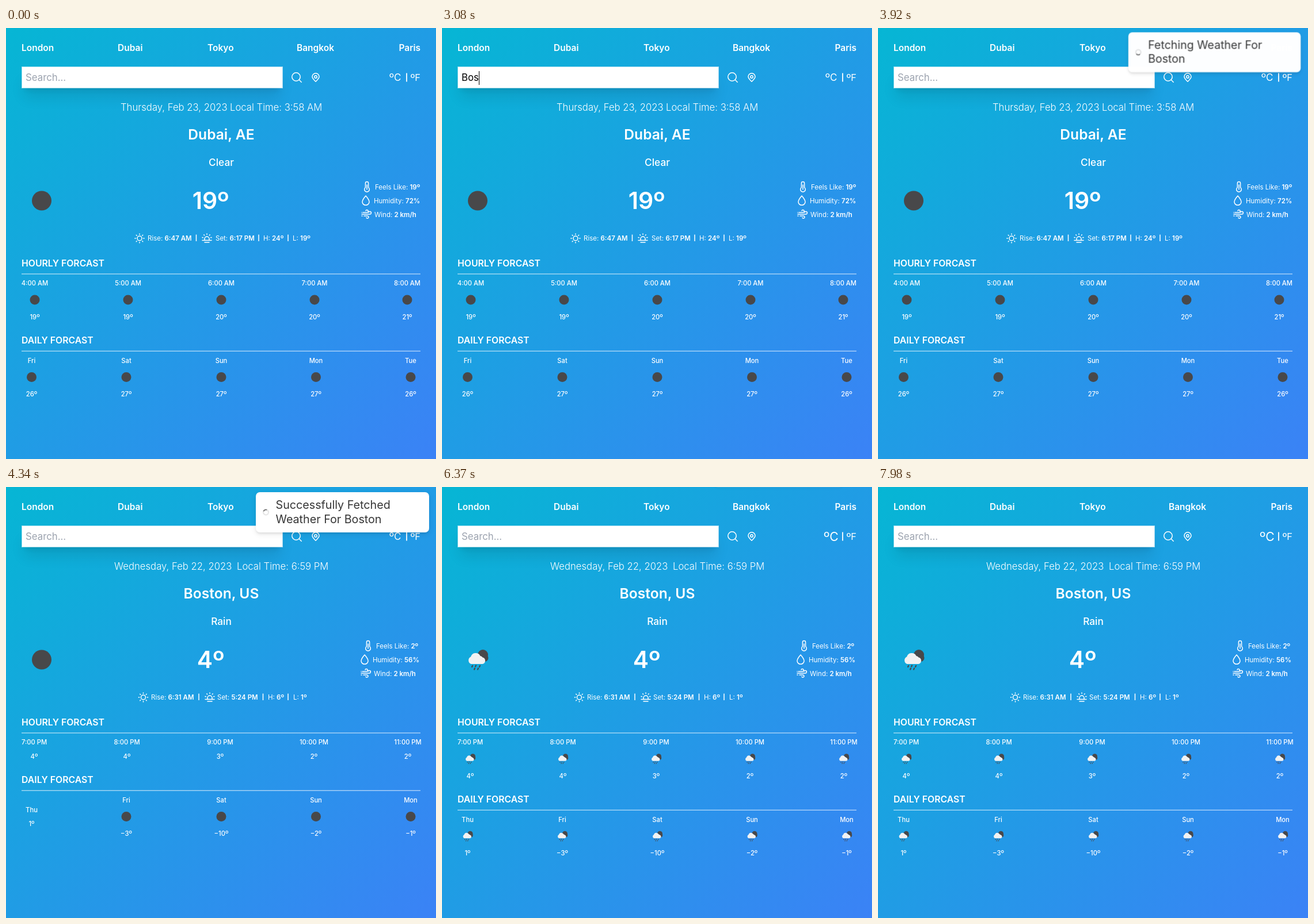
An HTML page for the animation above (8000 ms loop, 747x750 px).

```html
<!DOCTYPE html>
<html lang="en">
<head>
<meta charset="utf-8">
<title>Weather</title>
<style>
  html, body { margin: 0; width: 100%; height: 100%; overflow: hidden; }
  body {
    position: relative;
    background: linear-gradient(to bottom right, #06b6d4, #3b82f6);
    font-family: Inter, "Open Sans", sans-serif;
  }
  svg { position: absolute; left: 0; top: 0; overflow: visible; }
  text { white-space: pre; }
  .line { fill: none; stroke: #fff; stroke-width: 1.5; stroke-linecap: round; stroke-linejoin: round; }
  #search {
    position: absolute; left: 27px; top: 67px; width: 452px; height: 36px;
    border: 1px solid #fff9; background: #fff padding-box; font-size: 16.8px; line-height: 36px;
    box-shadow: 0 20px 25px -5px #0000001a, 0 8px 10px -6px #0000001a;
  }
  #search span { position: absolute; left: 6px; top: 0; white-space: pre; color: #000; }
  #search .hint { color: #9ca3af; }
  #search i { display: inline-block; width: 1px; height: 24px; margin-right: -1px; background: #000; vertical-align: middle; }
  #toast {
    position: absolute; left: 433.5px; top: 9px; width: 300.5px; height: 70px;
    border-radius: 7px; background: #fff; opacity: 0;
    box-shadow: 0 3px 10px #0000001a, 0 3px 3px #0000000d;
  }
</style>
</head>
<body>
<div id="search"></div>
<svg id="page" width="747" height="750" viewBox="0 0 747 750" fill="#fff"></svg>
<div id="toast"></div>

<script>
const LOOP = 8000;
const FETCH = 3640, TOAST_IN = 3655, DONE = 4300, ICONS = 4550, TOAST_OUT = 6270;
const CITY = 'Boston';
const $ = selector => document.querySelector(selector);

// Drawing helpers
const text = (x, y, content, size, anchor = 'start', weight = 400) =>
  `<text x="${x}" y="${y}" font-size="${size}" text-anchor="${anchor}" font-weight="${weight}">${content}</text>`;
const pair = (x, y, label, value) =>
  text(x, y, `${label} <tspan font-weight="600">${value}</tspan>`, 11.5);
const heading = (y, content) => text(27, y, content, 15.8, 'start', 600);
const bar = (x, y, height, width) =>
  `<rect x="${x - width / 2}" y="${y}" width="${width}" height="${height}"/>`;
const rule = y => `<rect x="27" y="${y}" width="693" height="1" opacity=".85"/>`;
const at = (x, y, content, scale = 1) => `<g transform="translate(${x} ${y}) scale(${scale})">${content}</g>`;
const line = d => `<path class="line" d="${d}"/>`;
const group = (id, content) => `<g id="${id}">${content}</g>`;

const rays = angles => angles.map(deg => {
  const a = deg * Math.PI / 180, c = Math.cos(a), s = Math.sin(a);
  return `M${(6.8 * c).toFixed(2)} ${(6.8 * s).toFixed(2)}L${(8.1 * c).toFixed(2)} ${(8.1 * s).toFixed(2)}`;
}).join('');

const icon = {
  sun: line('M4 0A4 4 0 1 1-4 0A4 4 0 1 1 4 0' + rays([0, 45, 90, 135, 180, 225, 270, 315])),
  sunset: line('M-4 3V1A4 4 0 0 1 4 1V3M-8 3.5H8M-4 7H4' + rays([190, 230, 270, 310, 350])),
  thermometer: line('M-2.6 1.5V-6A2.6 2.6 0 0 1 2.6-6V1.5A4.3 4.3 0 1 1-2.6 1.5ZM0-3V5'),
  drop: line('M0-8C3-4.5 6-1 6 2.5A6 5.8 0 0 1-6 2.5C-6-1-3-4.5 0-8Z'),
  wind: line('M-6-3H1A2.2 2.2 0 1 0-1-6M-8 0H6A2.3 2.3 0 1 0 4-3.2M-4 3H2A2.1 2.1 0 1 1 0 6M-8-3H-8M-8 3H-7'),
  moon: '<circle r="17" fill="#48484a"/>',
  rain: `<circle cx="9" cy="-8.5" r="9" fill="#48484a"/><circle cx="12" cy="-3" r="6.5" fill="#48484a"/>
    <path fill="#f2f2f2" d="M-11.5 7.5A6.8 6.8 0 0 1-12-5A8.8 8.8 0 0 1 4.5-6.5A6 6 0 0 1 8.5-4A5.9 5.9 0 0 1 8.5 7.5Z"/>
    <path fill="none" stroke="#48484a" stroke-width="2.2" stroke-linecap="round"
      d="M-9 10.5l-1 2M-3 10l-1 2M4 10.5l-1 2M-5 15l-1 2M1 15l-1 2"/>`
};

// Animation helpers
const animate = (el, steps) => el.animate(
  steps.map(([ms, props, easing = 'linear']) => ({ offset: ms / LOOP, easing, ...props })),
  { duration: LOOP, iterations: Infinity });

const show = (el, ...ranges) => animate(el, [
  [0, { opacity: ranges[0][0] === 0 ? 1 : 0 }, 'step-end'],
  ...ranges.flatMap(([from, to]) => [
    ...(from > 0 ? [[from, { opacity: 1 }, 'step-end']] : []),
    ...(to < LOOP ? [[to, { opacity: 0 }, 'step-end']] : [])
  ])
]);

// Weather data
const dubai = {
  dateX: 199, date: 'Thursday, Feb 23, 2023', timeX: 389, time: '3:58 AM',
  place: 'Dubai, AE', sky: 'Clear', temp: '19º',
  detailX: [641, 639, 640], details: ['19º', '72%', '2 km/h'],
  sunX: [232, 246, 330.5, 349, 364, 439, 447, 490, 498],
  sun: ['6:47 AM', '6:17 PM', '24º', '19º'],
  hourX: [50, 212, 374, 536, 697],
  hours: ['4:00 AM', '5:00 AM', '6:00 AM', '7:00 AM', '8:00 AM'],
  hourTemps: [19, 19, 20, 20, 21],
  days: ['Fri', 'Sat', 'Sun', 'Mon', 'Tue'], dayTemps: [26, 27, 27, 27, 26]
};
const boston = {
  dateX: 188, date: 'Wednesday, Feb 22, 2023', timeX: 401, time: '6:59 PM',
  place: 'Boston, US', sky: 'Rain', temp: '4º',
  detailX: [643, 637, 639], details: ['2º', '56%', '2 km/h'],
  sunX: [238.5, 252, 335, 354, 367, 446.5, 455, 490, 499],
  sun: ['6:31 AM', '5:24 PM', '6º', '1º'],
  hourX: [49, 210, 372, 535, 698],
  hours: ['7:00 PM', '8:00 PM', '9:00 PM', '10:00 PM', '11:00 PM'],
  hourTemps: [4, 4, 3, 2, 2],
  days: ['Thu', 'Fri', 'Sat', 'Sun', 'Mon'], dayTemps: [1, -3, -10, -2, -1]
};
const dayX = [44.5, 209, 374, 538.5, 703];

function summary(w) {
  const [sun, rise, bar1, dusk, set, bar2, high, bar3, low] = w.sunX;
  const labels = ['Feels Like:', 'Humidity:', 'Wind:'];
  const glyphs = [icon.thermometer, icon.drop, icon.wind];
  return text(w.dateX, 143.5, w.date, 16.7, 'start', 300)
    + text(w.timeX, 143.5, 'Local Time: ' + w.time, 16.7, 'start', 300)
    + text(374, 194, w.place, 24.6, 'middle', 600)
    + text(374, 239.5, w.sky, 17.3, 'middle', 500)
    + text(355.5, 314.5, w.temp, 41, 'middle', 600)
    + labels.map((label, i) => at(w.detailX[i] - 14, 276 + 24 * i, glyphs[i])
        + pair(w.detailX[i], 280.5 + 24 * i, label, w.details[i])).join('')
    + at(sun, 366, icon.sun) + pair(rise, 370, 'Rise:', w.sun[0])
    + at(dusk, 366, icon.sunset) + pair(set, 370, 'Set:', w.sun[1])
    + pair(high, 370, 'H:', w.sun[2]) + pair(low, 370, 'L:', w.sun[3])
    + [bar1, bar2, bar3].map(x => bar(x, 359.5, 11.5, 1.5)).join('');
}

const small = (x, y, content) => text(x, y, content, 11.2, 'middle', 500);
const degrees = n => `${n}`.replace('-', '−') + 'º';

// Cells without an icon collapse by the icon's height
function forecast(w, hourIcon, dayIcon) {
  const shift = hourIcon ? 0 : -34;
  const hours = w.hours.map((hour, i) => {
    const x = w.hourX[i];
    return small(x, 448, hour) + (hourIcon ? at(x, 473, hourIcon, .5) : '')
      + small(x, 506.5 + shift, degrees(w.hourTemps[i]));
  });
  const days = w.days.map((day, i) => {
    const x = dayX[i], empty = !hourIcon && i === 0;
    return small(x, empty ? 599.5 : 582.5, day) + (empty ? '' : at(x, 607.5, dayIcon, .5))
      + small(x, empty ? 623.5 : 641, degrees(w.dayTemps[i]));
  });
  return hours.join('') + at(0, shift, heading(549, 'DAILY FORCAST') + rule(561.7) + days.join(''));
}

// Page
const nav = [['London', 27], ['Dubai', 194], ['Tokyo', 350], ['Bangkok', 505]];
$('#page').innerHTML =
  nav.map(([city, x]) => text(x, 39.7, city, 15.5, 'start', 600)).join('')
  + text(720, 39.7, 'Paris', 15.5, 'end', 600)
  + at(505, 86, line('M6.2-1A7.2 7.2 0 1 1-8.2-1A7.2 7.2 0 1 1 6.2-1M4.3 4.3L8.2 8.2'))
  + at(538, 86, line('M0 7.2C-2.5 4.5-6 2-6-1.2A6 6 0 0 1 6-1.2C6 2 2.5 4.5 0 7.2ZM2.2-1A2.2 2.2 0 1 1-2.2-1A2.2 2.2 0 1 1 2.2-1'))
  + at(676, 86, group('celsius', text(0, 6, 'ºC', 17, 'middle')))
  + bar(696, 78.5, 15, 1.8)
  + text(720, 92, 'ºF', 16.4, 'end')
  + heading(414.5, 'HOURLY FORCAST') + rule(427.5)
  + group('dubai', summary(dubai))
  + group('boston', summary(boston))
  + group('moonBig', at(62, 300.5, icon.moon))
  + group('rainBig', at(62, 300.5, icon.rain))
  + group('dubaiForecast', forecast(dubai, icon.moon, icon.moon))
  + group('loadingForecast', forecast(boston, '', icon.moon))
  + group('bostonForecast', forecast(boston, icon.rain, icon.rain));

show($('#dubai'), [0, DONE]);
show($('#dubaiForecast'), [0, DONE]);
show($('#boston'), [DONE, LOOP]);
show($('#loadingForecast'), [DONE, ICONS]);
show($('#bostonForecast'), [ICONS, LOOP]);
show($('#moonBig'), [0, ICONS]);
show($('#rainBig'), [ICONS, LOOP]);
animate($('#celsius'), [
  [0, { transform: 'scale(1)' }],
  [5580, { transform: 'scale(1)' }, 'cubic-bezier(.4,0,.2,1)'],
  [5730, { transform: 'scale(1.25)' }],
  [LOOP, { transform: 'scale(1.25)' }]
]);

// Search field
const field = (html, ...ranges) => {
  const span = document.createElement('span');
  span.innerHTML = html;
  $('#search').append(span);
  show(span, ...ranges);
  return span;
};
const keys = [2660, 2870, 3080, 3290, 3430, 3500, FETCH];
field('Search...', [0, keys[0]], [FETCH, LOOP]).className = 'hint';
field('<i></i>', [2170, keys[0]], [4550, 5040], [5530, 6090], [6590, 7070]);
[...CITY].forEach((_, i) => field(CITY.slice(0, i + 1) + '<i></i>', [keys[i], keys[i + 1]]));

// Toast
const message = (id, first, second) => `<g id="${id}" fill="#363636">`
  + text(468, 37.7, first, 19.7) + text(468, 62.7, second, 19.7) + '</g>';
$('#toast').innerHTML = '<svg width="300.5" height="70" viewBox="433.5 9 300.5 70">'
  + message('fetching', 'Fetching Weather For', CITY)
  + message('fetched', 'Successfully Fetched', 'Weather For ' + CITY)
  + at(451, 44, `<g id="spinner" fill="none" stroke-width="1.8">
      <circle r="4.5" stroke="#e0e0e0"/><path d="M3.18-3.18A4.5 4.5 0 0 1 3.18 3.18" stroke="#616161"/></g>
    <g id="check"><circle r="9" fill="#61d345"/>
      <path id="tick" class="line" d="M-3.6.3L-1 2.9L3.8-2.6" pathLength="1" stroke-dasharray="1 2" style="stroke-width:1.9"/></g>`)
  + '</svg>';

const toastPose = (y, scale, opacity) => ({ transform: `translateY(${y}%) scale(${scale})`, opacity });
animate($('#toast'), [
  [0, toastPose(-200, .6, 0), 'step-end'],
  [TOAST_IN, toastPose(-200, .6, .5), 'cubic-bezier(.21,1.02,.73,1)'],
  [TOAST_IN + 350, toastPose(0, 1, 1)],
  [TOAST_OUT, toastPose(0, 1, 1), 'cubic-bezier(.06,.71,.55,1)'],
  [TOAST_OUT + 400, toastPose(-150, .6, 0)],
  [LOOP, toastPose(-150, .6, 0)]
]);
show($('#fetching'), [0, DONE]);
show($('#fetched'), [DONE, LOOP]);
show($('#spinner'), [0, DONE + 400]);
animate($('#spinner'), [
  [TOAST_IN, { transform: 'rotate(0deg)' }],
  [TOAST_IN + 1000, { transform: 'rotate(360deg)' }]
]);
const hidden = { transform: 'scale(0)', opacity: 0 };
const full = { transform: 'scale(1)', opacity: 1 };
animate($('#check'), [
  [0, hidden],
  [DONE + 100, hidden, 'cubic-bezier(.175,.885,.32,1.275)'],
  [DONE + 400, full],
  [LOOP, full]
]);
animate($('#tick'), [
  [0, { strokeDashoffset: 1.1 }],
  [DONE + 200, { strokeDashoffset: 1.1 }, 'ease-out'],
  [DONE + 400, { strokeDashoffset: 0 }],
  [LOOP, { strokeDashoffset: 0 }]
]);
</script>
</body>
</html>
```
